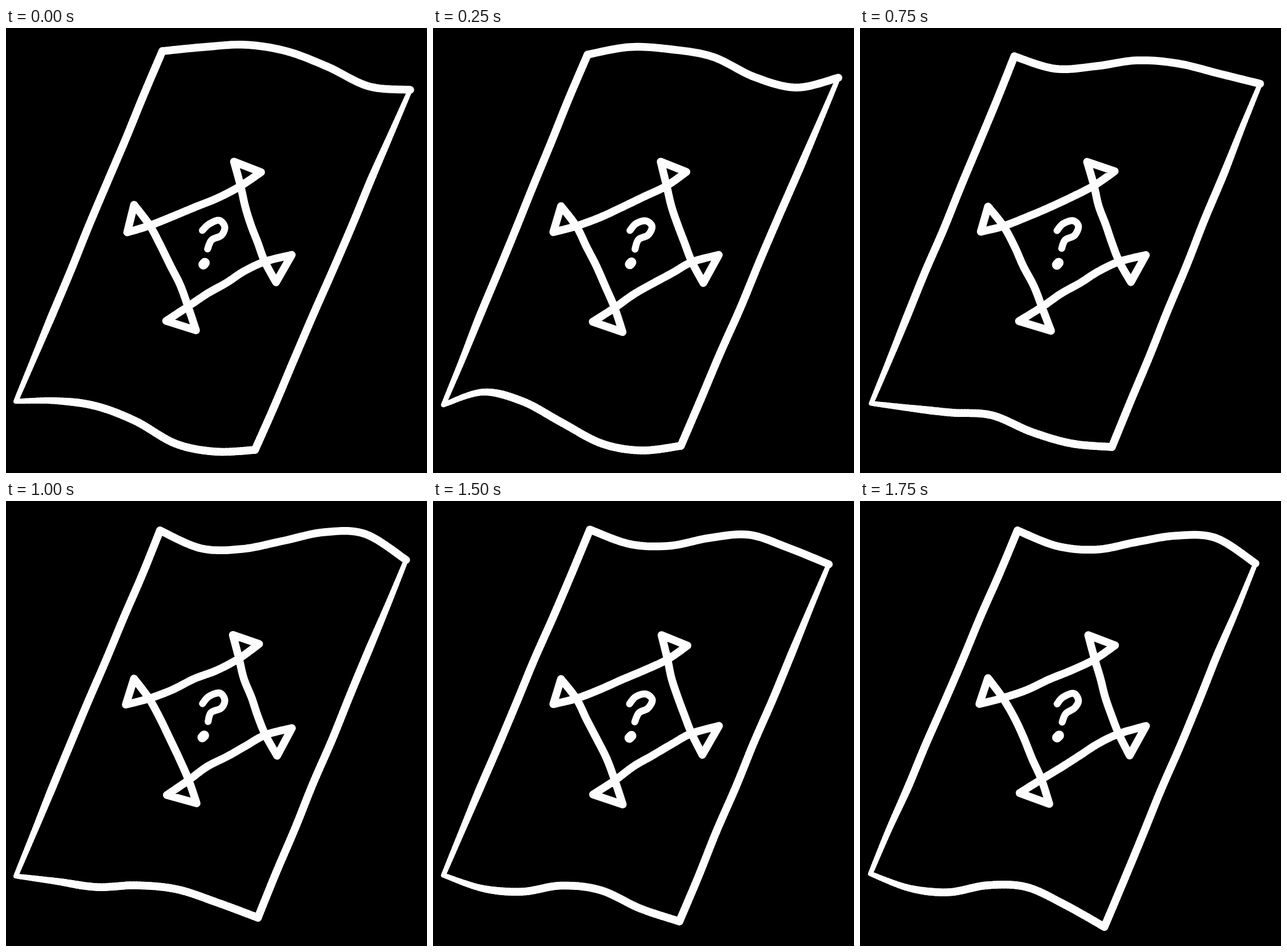
Animation of 727x770 px, one loop 2000 ms. Source, as an HTML page with a canvas:

```html
<!DOCTYPE html>
<html lang="en">
<head>
<meta charset="utf-8">
<title>Mystery card</title>
<style>
  html, body { margin: 0; width: 100%; height: 100%; overflow: hidden; background: #000; }
  canvas { display: block; }
</style>
</head>
<body>
<canvas id="stage" width="727" height="770"></canvas>
<script>
const INK = '#fdfdfd';
const STEP = 250;
const BOLD = 13.5;
const THIN = 8;
const CENTER = [350, 373];
const ctx = document.getElementById('stage').getContext('2d');

// Heights of the waving edges, evenly spaced between the x of their two ends.
// An empty slot is the pose halfway between its neighbours.
const card = (topX, top, bottomX, bottom) => ({ topX, top, bottomX, bottom });
const poses = [
  card([270, 698], [40, 33, 29, 40, 67, 101, 107], [17, 430], [646, 645, 654, 680, 719, 733, 730]),
  card([267, 700], [46, 33, 37, 50, 85, 103, 86], [18, 428], [652, 630, 646, 683, 719, 731, 723]),
  card([267, 691], [47, 59, 49, 43, 69, 101, 91], [22, 435], [650, 658, 663, 675, 726, 743, 729]),
  null,
  card([266, 691], [51, 82, 83, 69, 54, 57, 102], [17, 435], [649, 658, 668, 665, 672, 695, 721]),
  card([270, 684], [48, 71, 71, 57, 57, 99, 111], [18, 429], [650, 671, 675, 666, 679, 711, 718]),
  null,
  card([272, 683], [51, 78, 84, 71, 60, 64, 108], [18, 422], [645, 670, 677, 665, 668, 699, 737])
];

// Two tips of each loop on the knot: top, right, bottom, left.
const loops = [
  [[393, 231], [439, 249]],
  [[492, 391], [467, 440]],
  [[328, 525], [276, 507]],
  [[208, 353], [223, 307]]
];
const hook = [[340, 351], [350, 339], [368, 333], [378, 344], [371, 358], [355, 367], [349, 382]];
const dot = [[340, 409], [343, 406]];

const lerp = (a, b, t) => a + (b - a) * t;
const mix = (a, b, t) => a.map((v, i) => lerp(v, b[i], t));

function between(a, b) {
  const pose = {};
  for (const key in a) pose[key] = mix(a[key], b[key], 0.5);
  return pose;
}

function makeShaker(seed) {
  let n = seed * 7919 + 17;
  const random = () => (n = (n * 16807) % 2147483647) / 2147483647;
  for (let i = 0; i < 5; i++) random();
  return (point, size) => point.map(v => v + (random() * 2 - 1) * size);
}

// Catmull-Rom curve through the points.
function smooth(points, detail = 12) {
  const last = points.length - 1;
  const at = i => points[Math.max(0, Math.min(last, i))];
  const line = [];
  for (let i = 0; i < last; i++) {
    for (let k = 0; k < detail; k++) {
      const t = k / detail;
      line.push([0, 1].map(axis => {
        const [a, b, c, d] = [-1, 0, 1, 2].map(j => at(i + j)[axis]);
        return b + 0.5 * t * (c - a + t * (2 * a - 5 * b + 4 * c - d + t * (3 * (b - c) + d - a)));
      }));
    }
  }
  return [...line, points[last]];
}

const wave = ([x0, x1], heights) =>
  smooth(heights.map((y, i) => [lerp(x0, x1, i / (heights.length - 1)), y]));

function side(from, to, shake) {
  const inner = [1, 2, 3, 4, 5, 6, 7].map(i => shake(mix(from, to, i / 8), 1));
  return smooth([from, ...inner, to]);
}

// One closed line that crosses itself below each of its four loops.
function knot(shake) {
  const tips = loops.map(pair => pair.map(p => shake(p, 2)));
  let inward = [-12, 33];
  const crossings = tips.map(([a, b]) => {
    const [x, y] = mix(a, b, 0.5);
    const point = [x + inward[0], y + inward[1]];
    inward = [-inward[1], inward[0]];
    return point;
  });
  return tips.flatMap(([start], i) => {
    const next = (i + 1) % 4;
    const [from, to] = [crossings[i], crossings[next]];
    const bends = [0.25, 0.5, 0.75].map(t => shake(mix(mix(from, to, t), CENTER, 0.03), 1.5));
    return smooth([start, from, ...bends, to, tips[next][1]]);
  });
}

function stroke(line, width, closed) {
  ctx.lineWidth = width;
  ctx.beginPath();
  line.forEach(p => ctx.lineTo(...p));
  if (closed) ctx.closePath();
  ctx.stroke();
}

// Starts thin and swells to full weight over the first quarter.
function taper(line) {
  for (let i = 1; i < line.length; i++) {
    const u = Math.min(1, 4 * i / line.length);
    stroke([line[i - 1], line[i]], lerp(THIN, BOLD, u));
  }
}

function draw(index) {
  const pose = poses[index] || between(poses[index - 1], poses[index + 1]);
  const shake = makeShaker(index + 1);
  const top = wave(pose.topX, pose.top);
  const bottom = wave(pose.bottomX, pose.bottom);

  ctx.fillStyle = '#000';
  ctx.fillRect(0, 0, 727, 770);
  ctx.strokeStyle = INK;
  ctx.lineCap = ctx.lineJoin = 'round';

  stroke(top, BOLD);
  taper(bottom);
  taper(side(bottom[0], top[0], shake));
  taper(side(top.at(-1), bottom.at(-1), shake));
  stroke(knot(shake), BOLD, true);
  stroke(smooth(hook.map(p => shake(p, 1))), 12);
  stroke(dot.map(p => shake(p, 1)), 17);
}

let shown = -1;
function tick() {
  const index = Math.floor(performance.now() / STEP) % poses.length;
  if (index !== shown) draw(shown = index);
  requestAnimationFrame(tick);
}
tick();
</script>
</body>
</html>
```
